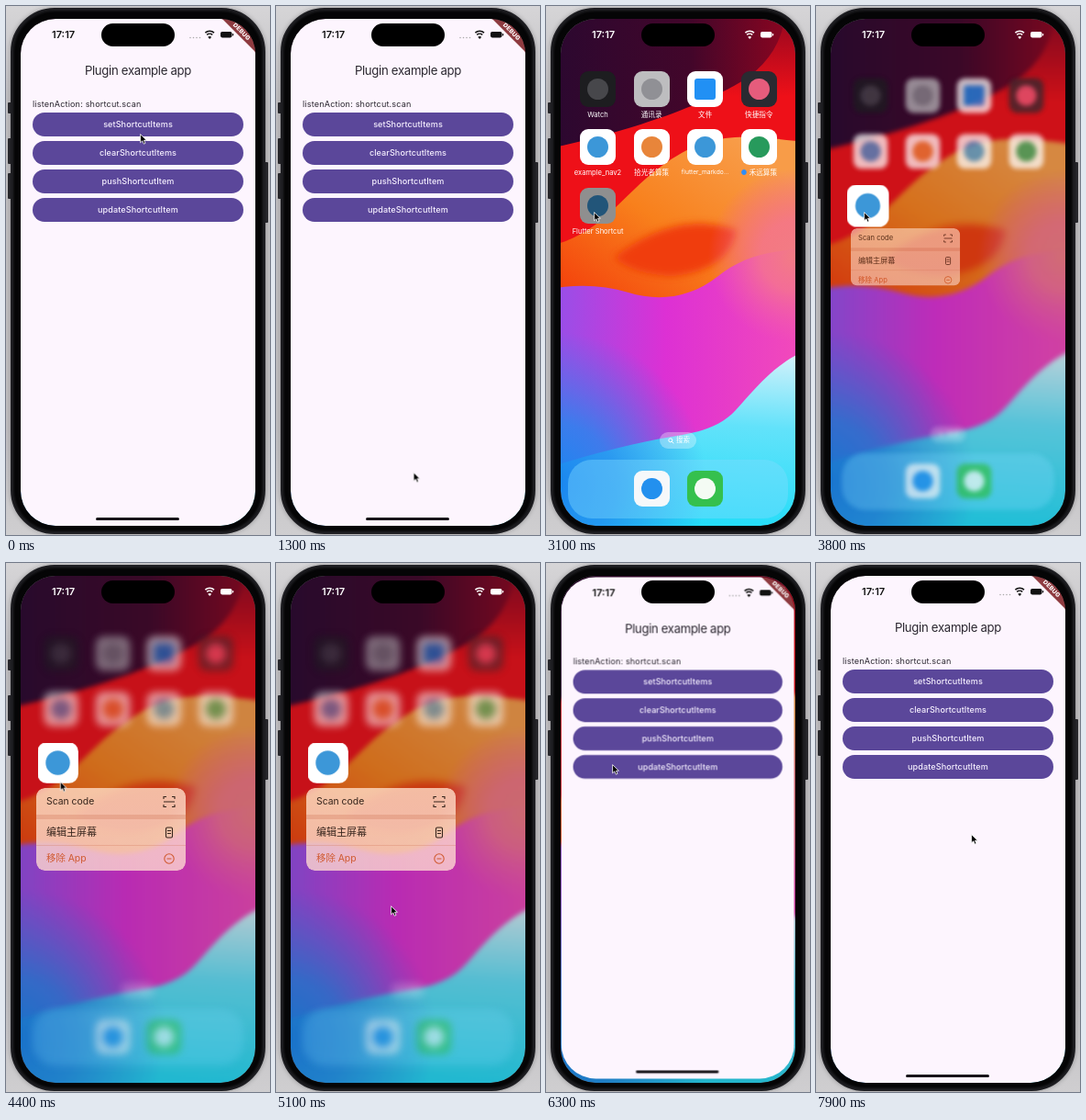
An HTML page for the animation above (8000 ms loop, 288 by 576 pixels).

```html
<!DOCTYPE html>
<html lang="en">
<head>
<meta charset="utf-8">
<title>Shortcut demo</title>
<style>
html, body { margin: 0; width: 100%; height: 100%; overflow: hidden; }
body { position: relative; background: linear-gradient(#d6d5d7, #bfbec1 18%, #bfbec1 80%, #cfced0); font-family: Inter, "Noto Sans CJK SC", "Noto Sans CJK", sans-serif; }
body *, body *::before { position: absolute; box-sizing: border-box; }
svg * { position: static; }

.key { background: #2a2a2e; width: 4px; border-radius: 1px; }
.phone { left: 5px; top: 2px; width: 278px; height: 573px; border-radius: 48px; background: #050506; border: 2px solid #1e1e22; box-shadow: 0 0 5px rgba(0, 0, 0, .3), inset 0 0 3px 1px #26262a; }
.screen { left: 16px; top: 14px; width: 256px; height: 552px; border-radius: 38px; overflow: hidden; background: #555; }
.screen > *, .layer { left: 0; top: 0; width: 256px; height: 552px; }
.screen > .island { left: 88px; top: 5px; width: 80px; height: 25px; border-radius: 13px; background: #000; }

/* Everything runs on one 8 s clock */
.wall, .dim, .grid, .homebar, .target, .target b, .icon span, .menu, .app, .grip, .cursor { animation: 8s linear infinite; }

.wall { overflow: visible; animation-name: wall; }
.dim { background: #16181c; animation-name: dim; }
.grid { animation-name: grid; }
.homebar { color: #fff; animation-name: homebar; }

.icon { left: calc(21px + 58.6px * var(--x)); top: calc(56.5px + 63.5px * var(--y)); width: 39px; height: 39px; }
.icon b { inset: 0; border-radius: 9px; background: var(--t, #fff); }
.icon b::before { content: ""; inset: 8px; border-radius: var(--r, 50%); background: var(--c); }
.icon span { left: -20px; width: 79px; top: 43px; text-align: center; font-size: 7.6px; line-height: 9px; color: #fff; white-space: nowrap; animation-name: caption; }
.icon em { position: static; color: #2f8df5; font-style: normal; }
.dock { left: 8px; top: 480px; width: 240px; height: 64px; border-radius: 26px; background: rgba(130, 220, 255, .4); }
.search { left: 108px; top: 450px; width: 40px; height: 18px; border-radius: 9px; background: rgba(255, 255, 255, .32); color: #fff; font-size: 7.5px; line-height: 18px; text-align: right; padding-right: 7px; }
.search svg { left: 9px; top: 6px; }

.target { animation-name: target; }
.target b { animation-name: press; }

.screen > .menu { left: 17px; top: 231px; width: 163px; height: 90px; border-radius: 9px; overflow: hidden; background: linear-gradient(rgba(255, 222, 200, .8), rgba(252, 216, 208, .8)); transform-origin: 0 0; font-size: 10.4px; color: #35241c; animation-name: menu; }
.menu div { left: 11px; line-height: 16px; white-space: nowrap; }
.menu i { left: 0; width: 100%; background: rgba(200, 110, 80, .28); }
.menu svg { left: 137px; top: 0; fill: none; stroke: #35241c; stroke-width: 1.1; }
.menu .han { font-size: 11px; }
.menu .red { color: #d05a30; }

.app { background: #fdf5fe; color: #2b2730; transform-origin: 0 0; animation-name: fly, fade; }
.bar time { left: 34px; top: 11px; font-size: 11px; font-weight: 600; line-height: 13px; }
.bar svg { left: 180px; top: 9px; fill: currentColor; }
.app .bar { color: #111; }
.title { left: 0; width: 100%; top: 46px; text-align: center; font-size: 13.2px; line-height: 20px; letter-spacing: -.32px; }
.note { left: 13px; top: 86px; font-size: 9.1px; line-height: 13px; letter-spacing: .16px; white-space: nowrap; }
.btn { left: 13px; width: 230px; height: 26px; border-radius: 13px; background: #5b479a; color: #f6f0ff; text-align: center; font-size: 9.1px; font-weight: 500; line-height: 25px; letter-spacing: .07px; }
.ribbon { left: 201px; top: 9px; width: 80px; height: 10px; background: #8e3b40; transform: rotate(45deg); color: #fff; text-align: center; font-size: 6.5px; font-weight: 800; line-height: 10px; letter-spacing: .2px; }
.grip { left: 82px; top: 543px; width: 91px; height: 3px; border-radius: 2px; background: #18151a; animation-name: grip; }

.cursor { left: 0; top: 0; animation-name: cursor; }

@keyframes wall {
  0%, 28.75% { filter: blur(3px); transform: scale(1.04); }
  34%, 41% { filter: blur(0); transform: none; }
  47.5%, 72% { filter: blur(2.5px); transform: scale(.985); }
  82%, 100% { filter: blur(3px); transform: scale(1.04); }
}
@keyframes dim {
  0%, 25% { opacity: .38; }
  28.75% { opacity: .3; }
  34%, 41% { opacity: 0; }
  47.5% { opacity: .15; }
  51%, 72% { opacity: .18; }
  80%, 100% { opacity: .2; }
}
@keyframes grid {
  0%, 25% { filter: blur(5px); transform: scale(.88); opacity: .1; }
  28.75% { filter: blur(4px); transform: scale(.91); opacity: .38; }
  34%, 41% { filter: blur(0); transform: none; opacity: 1; }
  47.5% { filter: blur(3px); transform: scale(.965); opacity: .72; }
  53%, 71.5% { filter: blur(4.2px); transform: scale(.96); opacity: .54; }
  80%, 100% { filter: blur(5px); transform: scale(.88); opacity: .1; }
}
@keyframes homebar {
  0%, 29% { opacity: 0; }
  34%, 72% { opacity: 1; }
  75%, 100% { opacity: 0; }
}
@keyframes target {
  0%, 32.5% { opacity: 0; }
  33.5%, 73% { opacity: 1; }
  74.5%, 100% { opacity: 0; }
}
@keyframes press {
  0%, 37.5% { filter: brightness(1); transform: none; }
  38.6%, 41.5% { filter: brightness(.56); transform: none; }
  46.25%, 48% { filter: brightness(1); transform: scale(1.18); }
  51%, 100% { filter: brightness(1); transform: scale(1.15); }
}
@keyframes caption {
  0%, 41.5% { opacity: 1; }
  45%, 100% { opacity: 0; }
}
@keyframes menu {
  0%, 45% { transform: translate(14px, -14px) scale(.2); clip-path: inset(0 0 10px round 9px); opacity: 0; }
  47.5% { transform: translate(5px, -3px) scale(.73); clip-path: inset(0 0 5px round 9px); opacity: .75; animation-timing-function: ease-out; }
  51%, 71.25% { transform: translate(0, 0) scale(1); clip-path: inset(0 0 0 round 9px); opacity: 1; animation-timing-function: ease-in; }
  74%, 100% { transform: translate(14px, -14px) scale(.2); clip-path: inset(0 0 10px round 9px); opacity: 0; }
}
@keyframes fly {
  0%, 25% { transform: translate(0, 0) scale(1); clip-path: inset(0 0 0 0 round 38px); animation-timing-function: cubic-bezier(.4, .2, .7, .9); }
  28.75% { transform: translate(9px, 107px) scale(.645); clip-path: inset(0 0 124px 0 round 39px); animation-timing-function: cubic-bezier(.3, .3, .4, 1); }
  33.5%, 72% { transform: translate(21px, 184px) scale(.152); clip-path: inset(0 0 296px 0 round 59px); animation-timing-function: cubic-bezier(.25, .4, .3, 1); }
  78.75% { transform: translate(.6px, 1.3px) scale(.993); clip-path: inset(0 0 2px 0 round 38px); }
  80.5%, 100% { transform: translate(0, 0) scale(1); clip-path: inset(0 0 0 0 round 38px); }
}
@keyframes grip {
  0%, 25% { transform: none; animation-timing-function: cubic-bezier(.4, .2, .7, .9); }
  28.75% { transform: translateY(-124px); animation-timing-function: cubic-bezier(.3, .3, .4, 1); }
  33.5%, 72% { transform: translateY(-296px); animation-timing-function: cubic-bezier(.25, .4, .3, 1); }
  78.75% { transform: translateY(-2px); }
  80.5%, 100% { transform: none; }
}
@keyframes fade {
  0%, 31.5% { opacity: 1; }
  33.5%, 72% { opacity: 0; }
  73.5%, 100% { opacity: 1; }
}
@keyframes cursor {
  0%, 1.25% { transform: translate(146px, 139px); animation-timing-function: ease-in-out; }
  21%, 25% { transform: translate(150px, 557px); }
  28.75% { transform: translate(171px, 193px); animation-timing-function: ease-in-out; }
  37.5%, 53% { transform: translate(52px, 224px); animation-timing-function: ease-in-out; }
  62.5%, 65% { transform: translate(125px, 373px); animation-timing-function: ease-in-out; }
  70.5%, 72.5% { transform: translate(72px, 256px); animation-timing-function: ease-in-out; }
  77.5%, 81.25% { transform: translate(72px, 219px); animation-timing-function: ease-in-out; }
  91.25%, 100% { transform: translate(169px, 295px); }
}
</style>
</head>
<body>
<svg width="0" height="0">
  <symbol id="signal" viewBox="180 9 60 18">
    <path d="M201.4 15.2a7 7 0 0 1 9.6 0M203.2 17.4a4.4 4.4 0 0 1 6 0" fill="none" stroke="currentColor" stroke-width="1.6"/>
    <path d="M206.2 22l-2-2.2a3 3 0 0 1 4 0z"/>
    <rect x="218" y="14" width="12.5" height="6.4" rx="1.8"/>
    <rect x="231" y="16" width="1.2" height="2.4" rx=".6"/>
  </symbol>
</svg>

<div class="key" style="left:2px;top:105px;height:12px"></div>
<div class="key" style="left:2px;top:144px;height:28px"></div>
<div class="key" style="left:2px;top:182px;height:28px"></div>
<div class="key" style="left:282px;top:170px;height:66px"></div>
<div class="phone"></div>

<div class="screen">
  <svg class="wall" viewBox="16 14 256 552">
    <defs>
      <linearGradient id="sky" x2="0" y2="1"><stop stop-color="#8a0520"/><stop offset=".17" stop-color="#ee1018"/></linearGradient>
      <linearGradient id="dusk"><stop stop-color="#2a0830"/><stop offset=".6" stop-color="#42062a"/><stop offset="1" stop-color="#8a0520"/></linearGradient>
      <linearGradient id="amber" x1=".7" x2=".2" y2=".7"><stop stop-color="#f89c48"/><stop offset=".5" stop-color="#f8801c"/><stop offset="1" stop-color="#f4420c"/></linearGradient>
      <linearGradient id="plum"><stop stop-color="#9052ea"/><stop offset=".45" stop-color="#dd30d4"/><stop offset="1" stop-color="#f44cb8"/></linearGradient>
      <linearGradient id="sea" x1=".7" x2=".6" y2="1"><stop stop-color="#d8f2fa"/><stop offset=".4" stop-color="#62e2fa"/><stop offset="1" stop-color="#1cdcf8"/></linearGradient>
      <radialGradient id="deep" gradientUnits="userSpaceOnUse" cx="10" cy="520" r="165"><stop stop-color="#1a86f0"/><stop offset=".4" stop-color="#2388ee" stop-opacity=".8"/><stop offset="1" stop-color="#2f7fe8" stop-opacity="0"/></radialGradient>
      <radialGradient id="blush" gradientUnits="userSpaceOnUse" cx="272" cy="272" r="95"><stop stop-color="#f27c84"/><stop offset=".4" stop-color="#f47490" stop-opacity=".85"/><stop offset="1" stop-color="#f060a8" stop-opacity="0"/></radialGradient>
      <filter id="soft" x="-.2" y="-.4" width="1.4" height="1.8"><feGaussianBlur stdDeviation="4"/></filter>
    </defs>
    <path d="M0 0H290V580H0Z" fill="url(#sky)"/>
    <path d="M0 0H262C260 40 240 68 205 87S110 132 0 156Z" fill="url(#dusk)"/>
    <path d="M0 262C62 250 82 204 132 170S215 140 290 149V420H0Z" fill="url(#amber)"/>
    <path d="M74 274C105 250 150 224 208 244C204 272 180 290 140 294C110 294 88 286 74 274Z" fill="#f03c0a" filter="url(#soft)"/>
    <path d="M0 309C30 303 60 303 90 312S155 320 188 294S250 268 290 262V580H0Z" fill="url(#plum)"/>
    <path d="M165 165H290V380H165Z" fill="url(#blush)"/>
    <path d="M290 372C250 388 230 415 207 440S150 466 120 472S40 490 0 504V580H290Z" fill="url(#sea)"/>
    <path d="M0 340H190V580H0Z" fill="url(#deep)"/>
  </svg>
  <div class="dim"></div>

  <div class="grid">
    <div class="icon" style="--x:0;--y:0;--t:#1d1d20;--c:#47474b"><b></b><span>Watch</span></div>
    <div class="icon" style="--x:1;--y:0;--t:#bdbdbf;--c:#909095"><b></b><span>通讯录</span></div>
    <div class="icon" style="--x:2;--y:0;--c:#2190f4;--r:3px"><b></b><span>文件</span></div>
    <div class="icon" style="--x:3;--y:0;--t:#2a2a31;--c:#e65c7c"><b></b><span>快捷指令</span></div>
    <div class="icon" style="--x:0;--y:1;--c:#3c97d8"><b></b><span>example_nav2</span></div>
    <div class="icon" style="--x:1;--y:1;--c:#e8853a"><b></b><span>拾光者算策</span></div>
    <div class="icon" style="--x:2;--y:1;--c:#3c97d8"><b></b><span style="font-size:6.7px">flutter_markdo…</span></div>
    <div class="icon" style="--x:3;--y:1;--c:#279a5c"><b></b><span><em>●</em> 禾远算策</span></div>
    <div class="search"><svg width="7" height="7" fill="none" stroke="#fff"><circle cx="2.8" cy="2.8" r="2"/><path d="M4.3 4.3L6.3 6.3"/></svg>搜索</div>
    <div class="dock"></div>
    <div class="icon" style="--x:1;--y:6.86;--c:#2390ee;--t:#f6f8fa"><b></b></div>
    <div class="icon" style="--x:2;--y:6.86;--c:#f4fbf4;--t:#35c04d"><b></b></div>
  </div>

  <div class="homebar bar"><time>17:17</time><svg width="60" height="18"><use href="#signal"/></svg></div>

  <div class="target"><div class="icon" style="--x:0;--y:2;--c:#3c97d8"><b></b><span>Flutter Shortcut</span></div></div>

  <div class="menu">
    <div style="top:7px">Scan code</div>
    <i style="top:29px;height:5px"></i>
    <div class="han" style="top:40px">编辑主屏幕</div>
    <i style="top:62px;height:1px"></i>
    <div class="red" style="top:69px">移除 App</div>
    <svg width="20" height="90">
      <path d="M2 12V9.5H5M11 9.5H14V12M14 18V20.5H11M5 20.5H2V18M2 15H14"/>
      <rect x="4.5" y="43" width="7" height="11" rx="1.5"/><path d="M6 46.5H10M6 49.5H10"/>
      <g stroke="#d05a30"><circle cx="8" cy="77" r="5.2"/><path d="M5.5 77H10.5"/></g>
    </svg>
  </div>

  <div class="app">
    <div class="layer bar">
      <time>17:17</time>
      <svg width="60" height="18"><path d="M5 11.5H16" fill="none" stroke="#aaa" stroke-width="1.6" stroke-linecap="round" stroke-dasharray="0 3.5"/><use href="#signal"/></svg>
    </div>
    <div class="title">Plugin example app</div>
    <div class="note">listenAction: shortcut.scan</div>
    <div class="btn" style="top:102px">setShortcutItems</div>
    <div class="btn" style="top:133px">clearShortcutItems</div>
    <div class="btn" style="top:164px">pushShortcutItem</div>
    <div class="btn" style="top:195px">updateShortcutItem</div>
    <div class="ribbon">DEBUG</div>
    <div class="grip"></div>
  </div>

  <div class="island"></div>
</div>

<svg class="cursor" width="10" height="14"><path d="M.6 .6V9.8L2.8 7.8L4.3 11.2L6 10.4L4.5 7.2H7.4Z" fill="#000" stroke="#fff" stroke-width=".8"/></svg>
</body>
</html>
```
